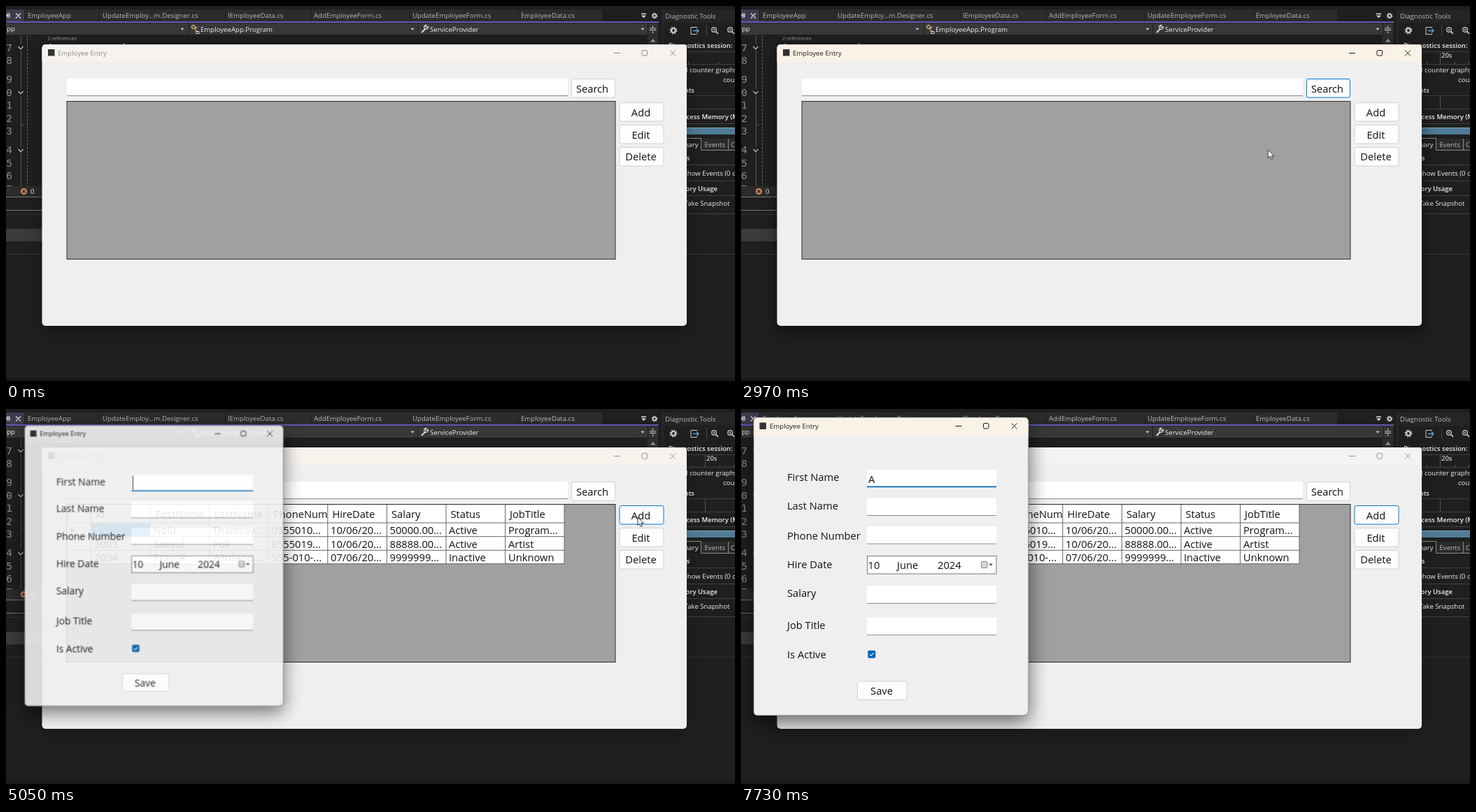
Recreate the animation shown at these times as an HTML page. Size 1042 by 537 pixels, loop 8000 ms.

```html
<!DOCTYPE html>
<html lang="en">
<head>
<meta charset="utf-8">
<title>Employee Entry</title>
<style>
html, body { margin: 0; width: 100%; height: 100%; overflow: hidden; background: #1f1f1f; }
svg { display: block; width: 1042px; height: 537px; }
text { font: 9.65px "Open Sans", "Noto Sans", sans-serif; fill: currentColor; white-space: pre; }
.b text, text.b { font-weight: 600; font-size: 9.5px; }
.end text, text.end { text-anchor: end; }
.big text { font-size: 14.7px; fill: #111; }
.mid text { text-anchor: middle; }
.nums text { font: 14.5px "DejaVu Sans Mono", "Noto Sans Mono", monospace; text-anchor: end; fill: #8b8b8b; }
.line { fill: none; }
.line:not([stroke]) { stroke: currentColor; }
.btn rect { fill: #fdfdfd; stroke: #d2d2d2; rx: 2.5px; }
.field { fill: #fff; }
.rule { stroke: #8a8a8a; }
.shade { filter: drop-shadow(0 7px 11px rgba(0, 0, 0, .5)); }
.deep { filter: drop-shadow(0 9px 14px rgba(0, 0, 0, .6)); }

/* One 8 s clock for everything; hard changes use step-end. */
.k { animation: 8s step-end infinite; }
.m { animation: 8s linear infinite; }

#mainBar { animation-name: mainBar; }
@keyframes mainBar {
  0%, .9% { fill: #f6f3ee; }
  5%, 31.5% { fill: #f3f3f3; }
  33%, 61.4% { fill: #faf2e6; }
  64.5%, 100% { fill: #f3f3f3; }
}
#mainHead { animation-name: mainHead; }
@keyframes mainHead {
  0%, 31.5% { color: #8b8b8b; }
  33%, 61.4% { color: #1c1c1c; }
  62.4%, 100% { color: #949494; }
}
#mainShade { animation-name: mainShade; }
@keyframes mainShade {
  0%, .9% { opacity: .7; }
  5%, 31.5% { opacity: .35; }
  33%, 61.4% { opacity: 1; }
  63.2%, 100% { opacity: .35; }
}
#search { animation-name: search; }
@keyframes search {
  0% { fill: #fdfdfd; stroke: #d2d2d2; }
  28.6% { fill: #e0eef9; stroke: #0078d4; }
  35.6% { fill: #fdfdfd; stroke: #0078d4; }
  61.3%, 100% { fill: #fdfdfd; stroke: #d2d2d2; }
}
#add { animation-name: add; }
@keyframes add {
  0% { fill: #fdfdfd; stroke: #d2d2d2; }
  52% { fill: #e0eef9; stroke: #0078d4; }
  62.2%, 100% { fill: #fdfdfd; stroke: #0078d4; }
}
#early { animation-name: early; }
@keyframes early { 0% { opacity: 1; } 28.7%, 100% { opacity: 0; } }
#late { animation-name: late; }
@keyframes late { 0% { opacity: 0; } 28.7%, 100% { opacity: 1; } }
#table { animation-name: table; }
@keyframes table { 0% { opacity: 0; } 37.85%, 100% { opacity: 1; } }

#form { transform-origin: 214.5px 225.5px; animation-name: form; }
@keyframes form {
  0%, 61.3% { opacity: 0; transform: translate(-3px, -1px) scale(.91); }
  63.1% { opacity: .9; transform: translate(-3px, -1px) scale(.94); }
  63.875% { opacity: 1; transform: translate(-2.2px, -.9px) scale(.962); }
  65.6%, 100% { opacity: 1; transform: none; }
}
#formBar { animation-name: formBar; }
@keyframes formBar { 0%, 63.9% { fill: #f4f3f1; } 66.5%, 100% { fill: #faf2e6; } }
#caret { animation-name: caret; }
@keyframes caret {
  0% { opacity: 1; transform: none; }
  69.6% { opacity: 0; transform: none; }
  75.86% { opacity: 1; transform: none; }
  82.48% { opacity: 0; transform: none; }
  89.1% { opacity: 1; transform: none; }
  89.98% { opacity: 1; transform: translateX(10px); }
  96.61%, 100% { opacity: 0; transform: translateX(10px); }
}
#typed { animation-name: typed; }
@keyframes typed { 0% { opacity: 0; } 89.98%, 100% { opacity: 1; } }

#pointer { animation-name: pointer; }
@keyframes pointer { 0% { opacity: 0; } 8.23% { opacity: 1; } 89.98%, 100% { opacity: 0; } }
#path { animation-name: path; }
@keyframes path {
  0%, 8.25% { transform: translate(538px, 463px); }
  10.4% { transform: translate(400px, 385px); }
  13% { transform: translate(299px, 265px); }
  15.5% { transform: translate(310px, 150px); }
  17.75% { transform: translate(371px, 102px); }
  20% { transform: translate(520px, 74px); }
  22% { transform: translate(618px, 68px); }
  25% { transform: translate(745px, 86px); }
  27.9% { transform: translate(825px, 110px); }
  30%, 34.5% { transform: translate(846px, 119px); }
  35.8% { transform: translate(810px, 142px); }
  37.125% { transform: translate(754px, 205px); }
  38.75%, 45.5% { transform: translate(675px, 329px); }
  48% { transform: translate(740px, 245px); }
  50.5% { transform: translate(845px, 155px); }
  52.5% { transform: translate(897px, 123px); }
  55.5%, 64.6% { transform: translate(903px, 155px); }
  67.5% { transform: translate(630px, 142px); }
  70.875%, 100% { transform: translate(385px, 133px); }
}
</style>
</head>
<body>
<svg viewBox="0 0 1042 537">
  <defs>
    <g id="controls">
      <path class="line" d="M-84 .5h9M-4 -3.5l8 8M4 -3.5l-8 8"/>
      <rect class="line" x="-44" y="-3.5" width="7.5" height="7.5" rx="1.5"/>
    </g>
    <g id="gear">
      <circle class="line" r="2.9" stroke-width="1.8"/>
      <circle class="line" r="4.6" stroke-width="1.6" stroke-dasharray="1.8 1.81"/>
    </g>
    <path id="drop" d="M-2.5 -1.2h5L0 1.8z" fill="#d0d0d0"/>
    <path id="fold" class="line" d="M-3.5 -2L0 1.8 3.5 -2" stroke-width="1.3"/>
    <g id="lens">
      <circle class="line" r="3.4" stroke-width="1.2"/>
      <path class="line" d="M2.5 2.5L6 6" stroke-width="1.7"/>
      <path class="line" d="M-2 0h4M0 -2v4" stroke="#6fb3e8"/>
    </g>
  </defs>

  <!-- Editor -->
  <g color="#b9b9b9">
    <rect width="1042" height="537" fill="#1f1f1f"/>
    <rect y="533" width="1042" height="4" fill="#19191a"/>
    <path d="M27 5h106v17H27zM134 5h179v17H134zM314 5h122v17H314zM437 5h140v17H437zM578 5h154v17H578zM733 5h119v17H733z" fill="#2c2c2c"/>
    <rect y="5" width="26" height="18" fill="#3d3b4d"/>
    <rect y="22" width="933" height="2" fill="#6457b5"/>
    <path class="line" d="M14 10.5l7 7M21 10.5l-7 7M0 13.5h5M2 11v5h3v-5z" stroke="#e0e0e0" stroke-width="1.2"/>
    <text x="31" y="17">EmployeeApp</text>
    <text x="138" y="17">UpdateEmploy...m.Designer.cs</text>
    <text x="317" y="17">IEmployeeData.cs</text>
    <text x="440" y="17">AddEmployeeForm.cs</text>
    <text x="581" y="17">UpdateEmployeeForm.cs</text>
    <text x="736" y="17">EmployeeData.cs</text>
    <path d="M908 10.5h7v1.5h-7zM908 13.5h7l-3.5 3.5z" fill="#ddd"/>
    <use href="#gear" transform="translate(927 14) scale(.8)" color="#ddd"/>

    <path d="M0 24.5h261v16.5H0zM262 24.5h326v16.5H262zM589 24.5h328v16.5H589z" fill="#383838"/>
    <rect x="918" y="24.5" width="14" height="17" fill="#333"/>
    <rect x="917" y="42" width="15" height="14" fill="#2e2e2e"/>
    <path d="M921 51.5h7.500L924.700 47z" fill="#999"/>
    <path class="line" d="M920 32h9M920 34.5h9M924.5 28v3M924.5 36v3" stroke="#ccc"/>
    <g color="#f0f0f0">
      <text class="end" x="13" y="36">pp</text>
      <text x="278" y="36.5">EmployeeApp.Program</text>
      <text x="606" y="36.5">ServiceProvider</text>
    </g>
    <use href="#drop" x="252" y="33"/><use href="#drop" x="581" y="33"/><use href="#drop" x="910" y="33"/>
    <path class="line" d="M265 30l3-3 3 3-3 3zM270 31h4M271 31v5h3" stroke="#dcb67a" stroke-width="1.2"/>
    <path class="line" d="M272 36.5h4v3h-4z" stroke="#ddd"/>
    <path class="line" d="M594 38l5-5" stroke="#ddd" stroke-width="2"/>
    <path class="line" d="M603.5 29.5a3 3 0 1 1-2.5-2.2l-1.5 2 1.5 1.5z" stroke="#ddd" stroke-width="1.2"/>

    <path class="line" d="M21.5 42v216M21.5 170.5h4" stroke="#555"/>
    <path class="line" d="M30.5 42v216" stroke="#666" stroke-dasharray="3 2"/>
    <g class="nums">
      <text x="9" y="65">7</text><text x="9" y="83">8</text><text x="9" y="110">9</text>
      <text x="9" y="129">0</text><text x="9" y="147">1</text><text x="9" y="166">2</text>
      <text x="9" y="184">3</text><text x="9" y="211">4</text><text x="9" y="230">5</text>
      <text x="9" y="248">6</text><text x="9" y="267">7</text>
    </g>
    <path d="M16 55h11v9H16zM16 119h11v9H16zM16 202h11v9H16z" fill="#1f1f1f"/>
    <use href="#fold" x="21" y="60"/><use href="#fold" x="21" y="124"/><use href="#fold" x="21" y="207"/>
    <text x="59" y="49" style="font-size:7.25px" color="#a0a0a0">2 references</text>
    <path d="M62 54h2v1h-2zM168 53h1.5v2h-1.5z" fill="#999"/>

    <rect y="258" width="60" height="15" fill="#2b2b2b"/>
    <circle cx="25.5" cy="265.5" r="4.6" fill="#d9825b"/>
    <path class="line" d="M23.5 263.5l4 4M27.5 263.5l-4 4" stroke="#222" stroke-width="1.2"/>
    <text x="35" y="269" color="#eee">0</text>
    <path class="line" d="M0 273.5h60M0 292.5h60" stroke="#777"/>
    <path class="line" d="M0 298.5h60M0 355.5h60M965 355.5h77" stroke="#333"/>
    <rect y="319" width="60" height="18" fill="#3b3b3b"/>
  </g>

  <!-- Diagnostics panel -->
  <g color="#f0f0f0">
    <path class="line" d="M938.5 5v50" stroke="#333"/>
    <rect x="939" y="5" width="103" height="19" fill="#252525"/>
    <text x="942" y="18" color="#bbb">Diagnostic Tools</text>
    <use href="#gear" x="954" y="35" color="#ddd"/>
    <path class="line" d="M988 30.5h-9v10h9" stroke="#ccc"/>
    <path class="line" d="M982 35.5h8M987 32.5l3 3-3 3" stroke="#4da3e0" stroke-width="1.4"/>
    <path class="line" d="M1001.5 27v16" stroke="#444"/>
    <use href="#lens" x="1012" y="34" color="#ccc"/><use href="#lens" x="1035" y="34" color="#ccc"/>
    <path class="line" d="M965 65.5h77M965 83.5h77M965 128.5h77M965 147.5h77M965 168.5h77M965 227.5h77M965 250.5h77M965 271.5h77M965 297.5h77" stroke="#424242"/>
    <g id="early" class="k"><path class="line" d="M975.5 80v3M1018.5 80v3" stroke="#555"/></g>
    <g id="late" class="k">
      <path class="line" d="M999.5 66v17M999.5 129v18M980.5 80v3M1020.5 80v3M1040.5 80v3" stroke="#555"/>
      <text class="b" x="1001" y="74" color="#ccc">20s</text>
    </g>
    <text x="972" y="95">l counter graphs</text>
    <text x="1025" y="109">cou</text>
    <g class="b">
      <text x="947" y="59.5">Diagnostics session:</text>
      <text class="end" x="984" y="124">Events</text>
      <text x="957" y="162">Process Memory (MB)</text>
      <text class="end" x="977.5" y="221">Events</text>
      <text class="end" x="1017" y="264.5">Memory Usage</text>
    </g>
    <rect x="965" y="174" width="77" height="10" fill="#507c98"/>
    <path class="line" d="M965 174.5h77" stroke="#7aa6c0"/>
    <path d="M994 190h38v16h-38zM1033 190h9v16h-9z" fill="#2b2b2b"/>
    <path class="line" d="M965 189.5h28.5v17M1032.5 190v16M994 206.5h48" stroke="#8a8a8a"/>
    <text class="end" x="989.5" y="201.5">Summary</text>
    <text x="998.5" y="201.5" color="#bbb">Events</text>
    <text x="1036" y="201.5" color="#bbb">CPU</text>
    <text x="968.5" y="243">Show Events (0 of 0)</text>
    <text class="end" x="1034.5" y="286">Take Snapshot</text>
  </g>

  <!-- Main window -->
  <g id="mainShade" class="m"><rect class="shade" x="52" y="55" width="921" height="403" rx="5"/></g>
  <rect x="51.5" y="55" width="921.5" height="403" rx="5" fill="#efefef"/>
  <path id="mainBar" class="m" d="M51.5 80V60a5 5 0 0 1 5-5H968a5 5 0 0 1 5 5v20z"/>
  <g id="mainHead" class="m">
    <rect x="60" y="62" width="9.5" height="9.5" fill="#333"/>
    <text x="74" y="71">Employee Entry</text>
    <use href="#controls" x="953" y="67"/>
  </g>
  <rect class="field" x="87" y="104" width="716" height="25" rx="1.5"/>
  <path class="rule" d="M87 128.5h716"/>
  <g class="btn big mid">
    <rect id="search" class="k" x="808.5" y="104.5" width="62" height="26.5"/><text x="838" y="123.5">Search</text>
    <rect id="add" class="k" x="877" y="138.5" width="63" height="26.5"/><text x="907.5" y="157.5">Add</text>
    <rect x="877" y="170.5" width="63" height="26.5"/><text x="907.5" y="189.5">Edit</text>
    <rect x="877" y="202.5" width="63" height="26.5"/><text x="907.5" y="221">Delete</text>
  </g>
  <rect x="87" y="136.5" width="784" height="226" fill="#a0a0a0" stroke="#2c2c2c"/>

  <g id="table" class="k">
    <rect x="87.5" y="137" width="710.5" height="84.5" fill="#fff"/>
    <rect x="121.5" y="163" width="84.5" height="20" fill="#0078d7"/>
    <path class="line" stroke="#666" d="M87 163h711M87 182.7h711M87 202.3h711M87 221.7h711M121.5 137v85M206 137v85M290.7 137v85M375.3 137v85M459.8 137v85M544.4 137v85M629 137v85M713.6 137v85M798 137v85"/>
    <path class="line" d="M87 363V136.5h784" stroke="#2c2c2c"/>
    <path d="M93 169.5v8l4.3-4z" fill="#222"/>
    <g class="big">
      <text x="128" y="156">Id</text><text x="213" y="156">FirstName</text><text x="297.5" y="156">LastName</text><text x="382" y="156">PhoneNum</text>
      <text x="466.5" y="156">HireDate</text><text x="551" y="156">Salary</text><text x="635.5" y="156">Status</text><text x="720" y="156">JobTitle</text>

      <text x="126" y="179" style="fill:#fff">1</text><text x="210.5" y="179">Nolu</text><text x="295" y="179">Thamrav...</text><text x="379.5" y="179">0555010...</text>
      <text x="464" y="179">10/06/20...</text><text x="548.5" y="179">50000.00...</text><text x="633" y="179">Active</text><text x="718" y="179">Program...</text>

      <text x="126" y="198.5">2003</text><text x="210.5" y="198.5">Saeyul</text><text x="295" y="198.5">Pok</text><text x="379.5" y="198.5">0555019...</text>
      <text x="464" y="198.5">10/06/20...</text><text x="548.5" y="198.5">88888.00...</text><text x="633" y="198.5">Active</text><text x="718" y="198.5">Artist</text>

      <text x="126" y="218">2004</text><text x="210.5" y="218">Pravok</text><text x="295" y="218">Wirdano...</text><text x="379.5" y="218">555-010-...</text>
      <text x="464" y="218">07/06/20...</text><text x="548.5" y="218">9999999...</text><text x="633" y="218">Inactive</text><text x="718" y="218">Unknown</text>
    </g>
  </g>

  <!-- Entry form -->
  <g id="form" class="m" color="#1c1c1c">
    <rect class="deep" x="18" y="12" width="393" height="427" rx="5"/>
    <rect x="18.2" y="12.2" width="392.6" height="426.6" rx="5" fill="#efefef" stroke="#888" stroke-width=".5"/>
    <path id="formBar" class="m" d="M18.5 38V17.500a5 5 0 0 1 5-5h382a5 5 0 0 1 5 5v20.500z"/>
    <rect x="26.5" y="19.5" width="9.5" height="9.5" fill="#333"/>
    <text x="41" y="28">Employee Entry</text>
    <use href="#controls" x="390.5" y="24"/>
    <g class="big">
      <text x="66" y="103">First Name</text>
      <text x="66" y="143.5">Last Name</text>
      <text x="66" y="186.5">Phone Number</text>
      <text x="66" y="227.5">Hire Date</text>
      <text x="66" y="269">Salary</text>
      <text x="66" y="314.5">Job Title</text>
      <text x="66" y="357">Is Active</text>
    </g>
    <path class="field" d="M180 87h185v25H180zM180 127.5h185V153H180zM180 168h185v25.5H180zM180 253h185v25.5H180zM180 298.5h185V324H180z"/>
    <path class="rule" d="M180 152.5h185M180 193h185M180 278.3h185M180 323.7h185"/>
    <rect x="180" y="110.5" width="185" height="1.7" fill="#0063b1"/>
    <rect x="180.5" y="210.5" width="184.5" height="25.5" fill="#fff" stroke="#7a7a7a"/>
    <g class="big">
      <text x="181.5" y="229">10</text><text x="223" y="229">June</text><text x="281" y="229">2024</text>
      <g id="typed" class="k"><text x="182" y="105.5">A</text></g>
    </g>
    <rect x="343.5" y="218.5" width="8.5" height="9" rx="1.5" fill="#d6d6d6" stroke="#888"/>
    <path d="M354 221.5h6l-3 3.3z" fill="#555"/>
    <rect x="181.3" y="345.7" width="11" height="11" rx="2" fill="#0063b1"/>
    <path class="line" d="M184 351.3l2 2 3.7-3.9" stroke="#fff" stroke-width="1.1"/>
    <g class="btn big mid"><rect x="166.5" y="390" width="70.5" height="26.5"/><text x="201" y="409">Save</text></g>
    <path d="M408 434h1.2v1.2h-1.2zM408 436.5h1.2v1.2h-1.2zM405.5 436.5h1.2v1.2h-1.2z" fill="#aaa"/>
    <rect id="caret" class="k" x="182" y="88" width="1" height="22" fill="#111"/>
  </g>

  <g id="pointer" class="k">
    <path id="path" class="m" d="M0 0v11.8l2.7-2.5 1.9 4.2 1.9-.9-1.9-4H8.3z" fill="#fff" stroke="#222" stroke-width=".9" stroke-linejoin="round"/>
  </g>
</svg>
</body>
</html>
```
